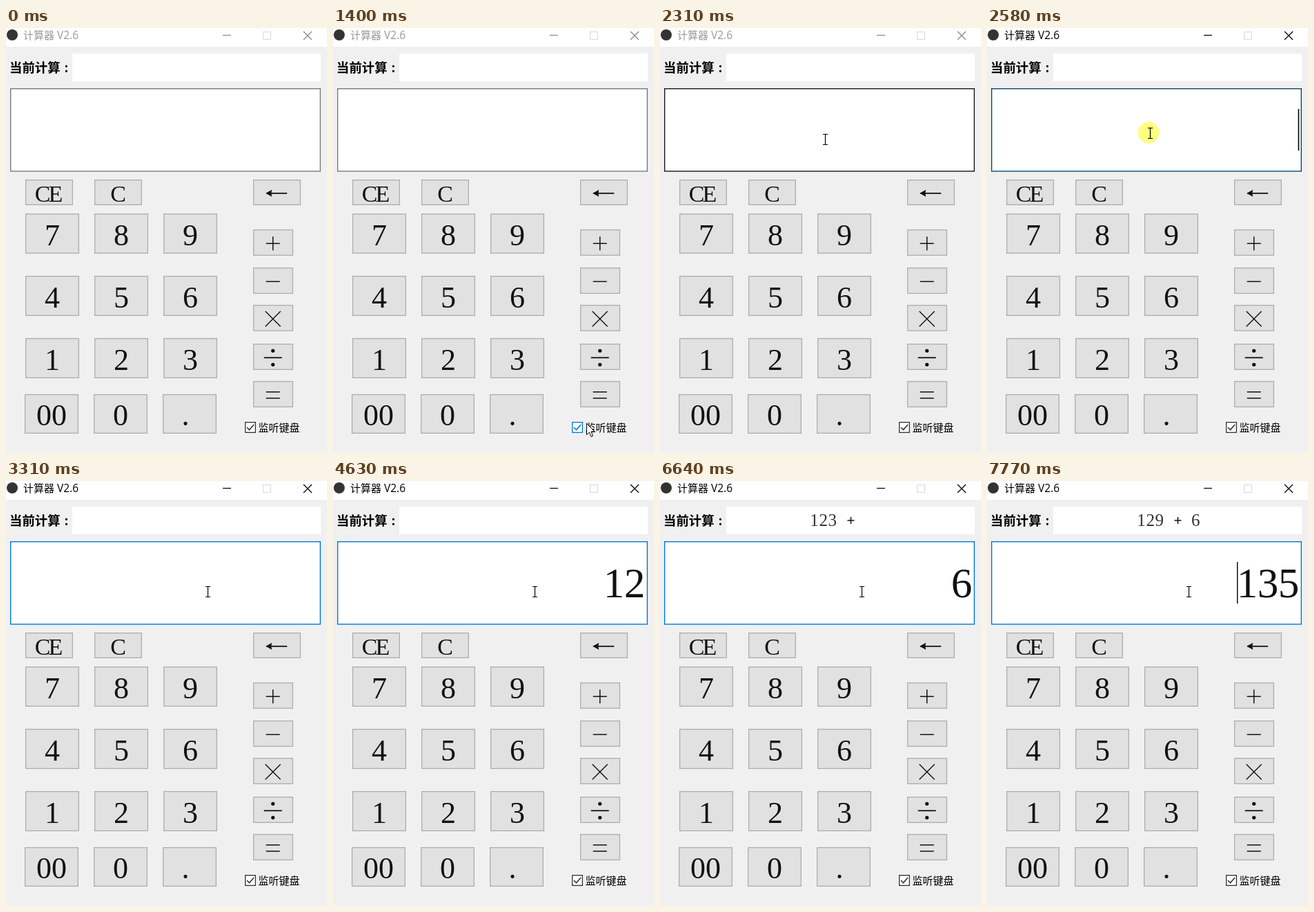
Write an HTML page with a canvas that moves like this. It is 465 by 614 pixels and loops after 8000 ms.

```html
<!DOCTYPE html>
<html lang="zh">
<head>
<meta charset="utf-8">
<title>计算器</title>
<style>
html, body { margin: 0; width: 100%; height: 100%; overflow: hidden; background: #f0f0f0; }
canvas { display: block; }
</style>
</head>
<body>
<canvas id="stage" width="465" height="614"></canvas>
<script>
const LOOP = 8000;
const SERIF = '"Liberation Serif", serif';
const CJK = '"Noto Sans CJK SC", "Noto Sans CJK", sans-serif';
const BLUE = '#0078d7', INK = '#111';
const ctx = document.getElementById('stage').getContext('2d');

// label, left, top, right, bottom
const buttons = [
  ['CE', 28, 219, 97, 256], ['C', 128, 219, 197, 256], ['←', 358, 219, 427, 256],
  ['+', 358, 291, 416, 329], ['−', 358, 346, 416, 384], ['×', 358, 400, 416, 438],
  ['÷', 358, 456, 416, 494], ['=', 358, 510, 416, 548]
];
['789', '456', '123'].forEach((row, r) => [...row].forEach((d, c) => {
  const x = 28 + 100 * c, y = 268.5 + 90.2 * r | 0;
  buttons.push([d, x, y, x + 78, y + 58]);
}));
['00', '0', '.'].forEach((d, c) => buttons.push([d, 27 + 100 * c, 529, 105 + 100 * c, 586]));

// cursor path: step, x, y
const STEP = 68.4, START = 980;
const path = [
  [0, 386, 611], [3, 380, 596], [6, 367, 571], [7, 354, 552], [11, 307, 401],
  [14, 268, 290], [15, 245, 190], [16, 242, 169], [22, 236, 152], [31, 236, 152], [34, 292, 160]
];

// time, value
const entries = [[0, ''], [4370, '1'], [4630, '12'], [4900, '123'], [5710, ''], [6640, '6'], [7440, '129'], [7770, '135']];
const sums = [[0, ''], [5710, '123 +'], [7440, '123 + 6'], [7770, '129 + 6']];
const carets = [[0, 0], [2510, 1], [3170, 0], [3770, 1], [4300, 0], [5430, 1], [6240, 0], [7170, 1]];
const at = (list, t) => list.findLast(e => e[0] <= t)[1];

const clamp = v => Math.max(0, Math.min(1, v));
const mix = (a, b, k) => `rgb(${a.map((v, i) => v + (b[i] - v) * clamp(k))})`;

// the edge lies fully inside the box
function box(x1, y1, x2, y2, fill, edge, width = 1.3) {
  ctx.fillStyle = fill;
  ctx.fillRect(x1, y1, x2 - x1, y2 - y1);
  if (!edge) return;
  ctx.strokeStyle = edge;
  ctx.lineWidth = width;
  ctx.strokeRect(x1 + width / 2, y1 + width / 2, x2 - x1 - width, y2 - y1 - width);
}

function line(color, width, ...p) {
  ctx.beginPath();
  for (let i = 0; i < p.length; i += 2) ctx.lineTo(p[i], p[i + 1]);
  ctx.strokeStyle = color;
  ctx.lineWidth = width;
  ctx.stroke();
}

function dot(x, y, r, color) {
  ctx.beginPath();
  ctx.arc(x, y, r, 0, 7);
  ctx.fillStyle = color;
  ctx.fill();
}

function text(s, x, y, font, color = '#000', align = 'left') {
  ctx.font = font;
  ctx.textAlign = align;
  ctx.fillStyle = color;
  ctx.fillText(s, x, y);
}

// characters on a fixed pitch, x is the left edge
function mono(s, x, y, size, pitch, color = INK) {
  [...s].forEach((c, i) => text(c, x + (i + .5) * pitch, y, `${size}px ${SERIF}`, color, 'center'));
}

function sign(s, x, y, r = 10) {
  const bar = (dy, w = r, width = 1.5) => line(INK, width, x - w, y + dy, x + w, y + dy);
  if (s === '+') { bar(0); line(INK, 1.5, x, y - r, x, y + r); }
  if (s === '−') bar(0);
  if (s === '=') { bar(-4.5); bar(4.5); }
  if (s === '÷') { bar(0, 13, 1.8); dot(x, y - 10, 2.6, INK); dot(x, y + 10, 2.6, INK); }
  if (s === '×') {
    line(INK, 1.4, x - 11, y - 11, x + 11, y + 11);
    line(INK, 1.4, x - 11, y + 11, x + 11, y - 11);
  }
  if (s === '←') {
    bar(0, 15, 1.8);
    ctx.fillStyle = INK;
    ctx.fill(new Path2D(`M${x - 16} ${y}l9-5-1 5 1 5z`));
  }
}

function cursor(t) {
  const k = Math.floor((t - START) / STEP);
  if (k < 0) return null;
  const i = path.findIndex(p => p[0] > k);
  if (i < 0) return path[path.length - 1].slice(1);
  const [a, b] = [path[i - 1], path[i]], f = (k - a[0]) / (b[0] - a[0]);
  return [a[1] + (b[1] - a[1]) * f, a[2] + (b[2] - a[2]) * f];
}

function drawCursor([x, y], beam) {
  ctx.save();
  ctx.translate(Math.round(x) + .5, Math.round(y) + .5);
  if (beam) {
    line('#000', 1, -3.5, -8, 3.5, -8);
    line('#000', 1, -3.5, 7, 3.5, 7);
    line('#000', 1.2, 0, -8, 0, 7);
  } else {
    const arrow = new Path2D('M0 0V16L4 12.5 6.5 19 9 18 6.5 11.5H11.5z');
    ctx.fillStyle = '#fff';
    ctx.fill(arrow);
    ctx.strokeStyle = '#000';
    ctx.lineWidth = 1;
    ctx.stroke(arrow);
  }
  ctx.restore();
}

function drawButton([s, x1, y1, x2, y2], hot) {
  box(x1, y1, x2, y2, hot ? '#e5f1fb' : '#e1e1e1', hot ? BLUE : '#adadad');
  const cx = (x1 + x2) / 2, cy = (y1 + y2) / 2;
  if (s === '.') mono(s, cx - 17, y2 - 12, 44, 22);
  else if (/\d/.test(s)) mono(s, cx - 11 * s.length, y2 - 12, 44, 22);
  else if (/C/.test(s)) mono(s, cx - 9.5 * s.length, y2 - 5.5, 34, 19);
  else sign(s, cx - .3, cy + 1.3);
}

function draw(t) {
  const pos = cursor(t), active = t >= 2510;
  const over = (x1, y1, x2, y2) => pos && pos[0] >= x1 && pos[0] < x2 && pos[1] >= y1 && pos[1] < y2;
  box(0, 0, 465, 614, '#f0f0f0');

  // title bar
  box(0, 0, 465, 27, '#fff');
  dot(9, 10, 8, '#333');
  const ink = active ? '#000' : '#999', icon = active ? '#000' : '#888';
  text('计算器', 25, 16, `15px ${CJK}`, ink);
  text('V2.6', 74, 16, '15.5px "Open Sans", sans-serif', ink);
  line(icon, 1.2, 314, 10.5, 326, 10.5);
  box(372, 5, 384, 17, '#fff', '#ddd', 1.2);
  line(icon, 1.2, 431, 5, 443, 17);
  line(icon, 1.2, 431, 17, 443, 5);

  // running sum
  box(96, 37, 456, 77, '#fff');
  text('当前计算', 5, 64, `bold 18.4px ${CJK}`);
  text(':', 87.5, 64, `bold 18px ${CJK}`, '#000', 'center');
  const sum = at(sums, t);
  mono(sum.replace('+', ' '), 217, 65, 25, 13.1, '#333');
  if (sum) sign('+', 276.5, 57, 5);

  // entry field
  const edge = active
    ? mix([23, 23, 23], [0, 120, 215], (t - 2510) / 150)
    : mix([122, 122, 122], [23, 23, 23], (t - 2110) / 200);
  box(6, 87, 456, 207.6, '#fff', edge, 1.4);
  const entry = at(entries, t);
  mono(entry, 452 - 30 * entry.length, 168, 61, 30);
  if (at(carets, t)) box(t < 7440 ? 450.6 : 362, 117, t < 7440 ? 452.2 : 363.4, 177, '#000');

  buttons.forEach(b => drawButton(b, over(...b.slice(1))));

  const mark = over(345, 566, 427, 588) ? BLUE : '#333';
  box(346, 569, 362, 585, '#fff', mark);
  line(mark, 1.6, 349, 577, 352.5, 580.5, 359, 573);
  text('监听键盘', 365.5, 583, `500 15px ${CJK}`);

  if (t >= 2510 && t < 2650) dot(234, 151, 15.5, '#ffff80');
  if (pos) drawCursor(pos, over(6, 87, 456, 187));
}

function frame() {
  draw(performance.now() % LOOP);
  requestAnimationFrame(frame);
}
frame();
</script>
</body>
</html>
```
